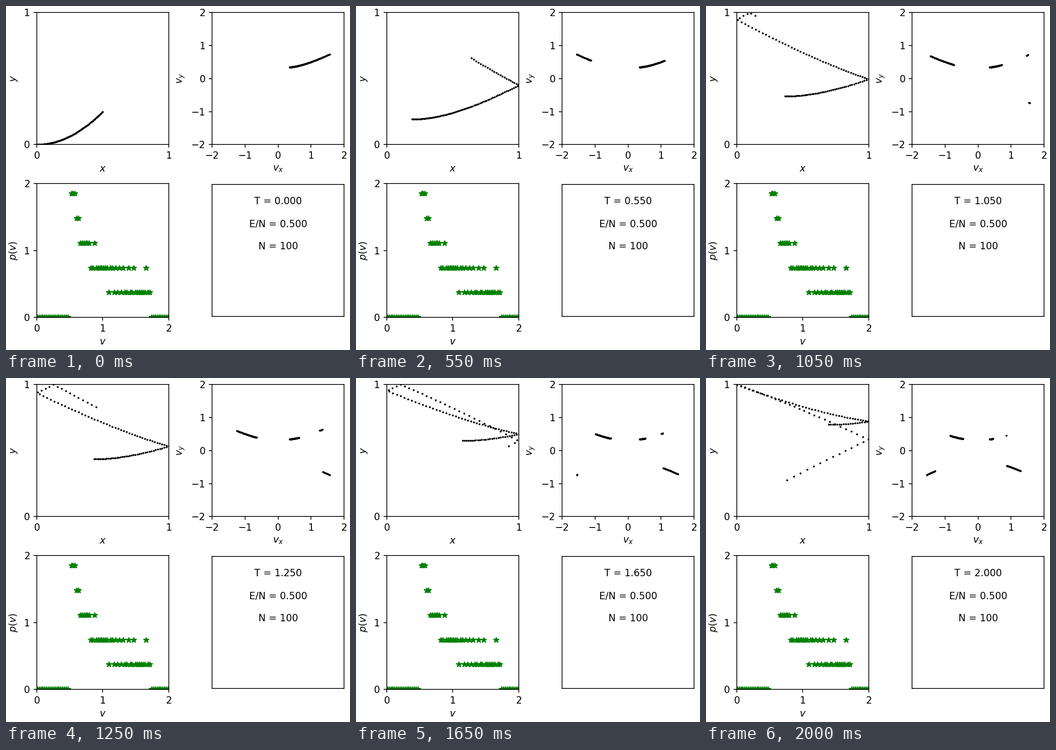
Recreate the animation shown at these times as a matplotlib script. Size 748 by 748 pixels, loop 2050 ms.

```python
import numpy as np
import matplotlib.pyplot as plt
from matplotlib.animation import FuncAnimation

SIZE, DPI = 748, 150
FRAMES, STEP = 41, 0.05
N, BINS, V_MAX = 100, 74, 2.0

# Particles start on a parabola; speeds are scaled to unit mean square.
x0 = np.linspace(0, 0.5, N)
y0 = x0 ** 2
vx0, vy0 = np.exp(3 * x0), np.exp(3 * y0)
scale = 1 / np.sqrt(np.mean(vx0 ** 2 + vy0 ** 2))
vx0, vy0 = vx0 * scale, vy0 * scale


def bounce(start, speed, t):
    """Position and velocity between reflecting walls at 0 and 1."""
    phase = (start + speed * t) % 2
    return 1 - np.abs(1 - phase), np.where(phase <= 1, speed, -speed)


fig = plt.figure(figsize=(SIZE / DPI, SIZE / DPI), dpi=DPI, facecolor="white")


def panel(left, top, width, height):
    return fig.add_axes([left / SIZE, 1 - (top + height) / SIZE,
                         width / SIZE, height / SIZE])


def setup(ax, xlim, ylim, xlabel, ylabel, label_x):
    for axis, (lo, hi) in ((ax.xaxis, xlim), (ax.yaxis, ylim)):
        axis.set_ticks(range(lo, hi + 1))
    ax.set(xlim=xlim, ylim=ylim, xlabel=xlabel, ylabel=ylabel)
    box = ax.get_position()
    ax.yaxis.set_label_coords(label_x / SIZE, (box.y0 + box.y1) / 2,
                              transform=fig.transFigure)


space = panel(66.9, 14.3, 287, 287)
phase = panel(448.1, 14.3, 287, 287)
hist = panel(66.9, 386.3, 287, 291)
info = panel(448.1, 388.3, 287, 287)

setup(space, (0, 1), (0, 1), "$x$", "$y$", 28)
setup(phase, (-2, 2), (-2, 2), "$v_x$", "$v_y$", 391.5)
setup(hist, (0, 2), (0, 2), "$v$", "$p(v)$", 28)
info.set(xticks=[], yticks=[], xlim=(0, 1), ylim=(0, 1))

dots, = space.plot([], [], "k.", ms=2)
vels, = phase.plot([], [], "k.", ms=2)

density, edges = np.histogram(np.hypot(vx0, vy0), bins=BINS,
                              range=(0, V_MAX), density=True)
hist.plot((edges[:-1] + edges[1:]) / 2, density, "g*")

clock = info.text(0.5, 0.85, "", ha="center")
energy = np.mean(vx0 ** 2 + vy0 ** 2) / 2
info.text(0.5, 0.68, f"E/N = {energy:.3f}", ha="center")
info.text(0.5, 0.51, f"N = {N}", ha="center")


def update(frame):
    t = frame * STEP
    x, vx = bounce(x0, vx0, t)
    y, vy = bounce(y0, vy0, t)
    dots.set_data(x, y)
    vels.set_data(vx, vy)
    clock.set_text(f"T = {t:.3f}")
    return dots, vels, clock


anim = FuncAnimation(fig, update, frames=FRAMES, interval=50,
                     repeat=True, repeat_delay=0)
plt.show()
```
